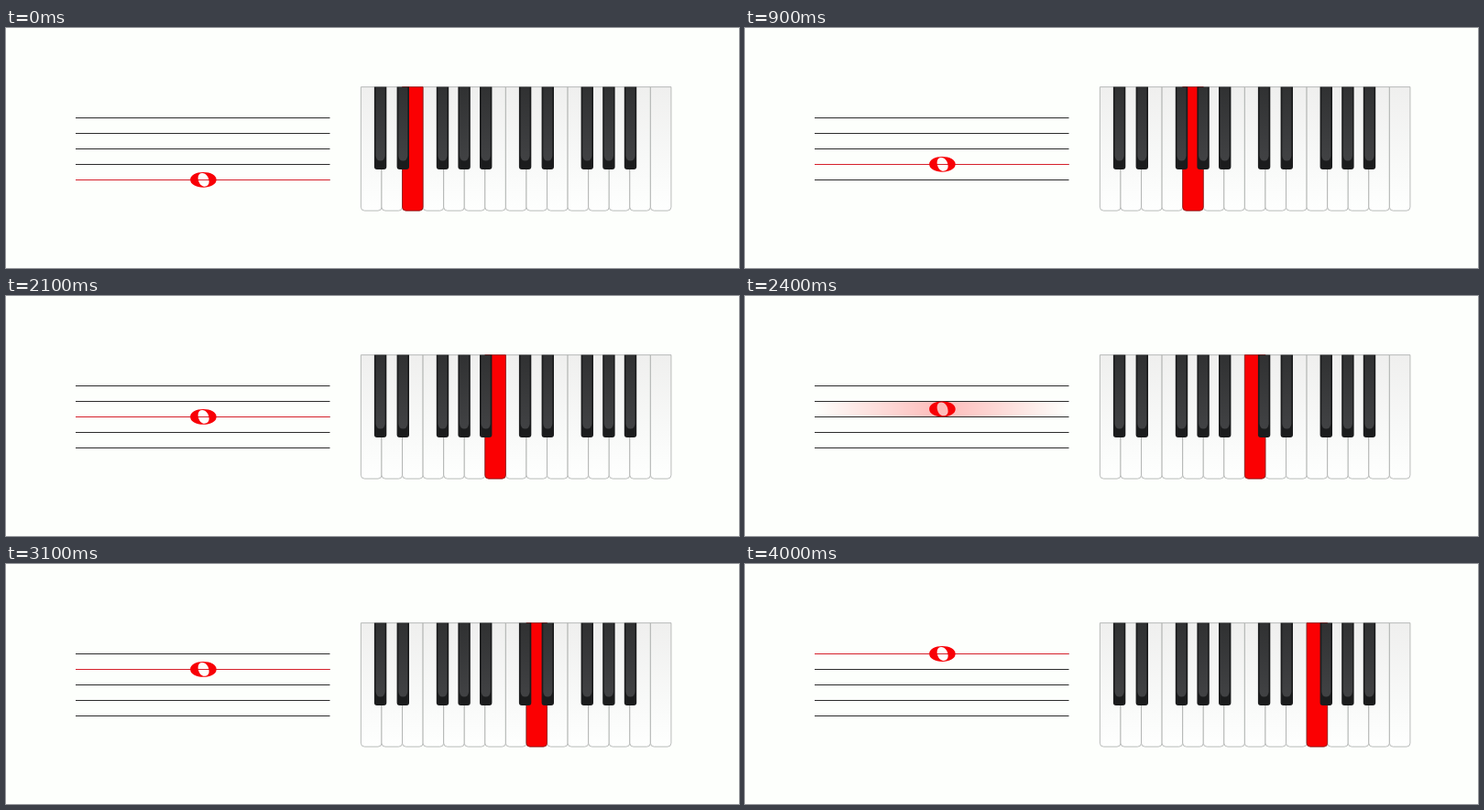
An HTML page that plays this animation: 800x263 px, repeating every 4.7 s.

```html
<!DOCTYPE html>
<html lang="en">
<head>
<meta charset="utf-8">
<title>Notes on the staff and the keyboard</title>
<style>
  html, body { margin: 0; width: 100%; height: 100%; overflow: hidden; background: #fdfffc; }
  svg { display: block; width: 800px; height: 263px; }
  .note { visibility: hidden; animation: middle 4.7s step-end infinite; }
  .note.first { animation-name: first; }
  .note.last { animation-name: last; }
  /* 400 ms, 500 ms and the closing 800 ms of a 4700 ms loop */
  @keyframes first { 0% { visibility: visible; } 8.5106%, 100% { visibility: hidden; } }
  @keyframes middle { 0% { visibility: visible; } 10.6383%, 100% { visibility: hidden; } }
  @keyframes last { 0% { visibility: hidden; } 82.9787%, 100% { visibility: visible; } }
</style>
</head>
<body>
<svg viewBox="0 0 800 263">
  <defs>
    <linearGradient id="ivory" x1="0" y1="0" x2="0" y2="1">
      <stop offset="0" stop-color="#efefee"/>
      <stop offset=".6" stop-color="#f8f9f8"/>
      <stop offset="1" stop-color="#fefffe"/>
    </linearGradient>
    <linearGradient id="ebony" x1="0" y1="0" x2="0" y2="1">
      <stop offset="0" stop-color="#303132"/>
      <stop offset="1" stop-color="#414244"/>
    </linearGradient>
    <linearGradient id="glow">
      <stop offset="0" stop-color="#f00" stop-opacity="0"/>
      <stop offset=".5" stop-color="#f00" stop-opacity=".27"/>
      <stop offset="1" stop-color="#f00" stop-opacity="0"/>
    </linearGradient>
  </defs>
  <g id="bands"></g>
  <g id="staff"></g>
  <g id="heads"></g>
  <g id="whites"></g>
  <g id="pressed"></g>
  <g id="blacks"></g>
</svg>
<script>
  const KEY_LEFT = 387.4, KEY_TOP = 64.6, KEY_WIDTH = 22.57, KEY_HEIGHT = 135.6;
  const STAFF_LEFT = 76, STAFF_WIDTH = 277.5, BOTTOM_LINE = 166.3, GAP = 16.95;
  const NOTE_COUNT = 9, FIRST_KEY = 2;

  function add(layer, tag, attrs) {
    const el = document.createElementNS('http://www.w3.org/2000/svg', tag);
    for (const name in attrs) el.setAttribute(name, attrs[name]);
    document.getElementById(layer).append(el);
    return el;
  }

  function schedule(el, i) {
    el.classList.add('note');
    if (i === 0) el.classList.add('first');
    else if (i === NOTE_COUNT - 1) el.classList.add('last');
    else el.style.animationDelay = `${i * 500 - 100}ms`;
  }

  function staffLine(y, color) {
    return add('staff', 'rect', {
      x: STAFF_LEFT, y: Math.floor(y), width: STAFF_WIDTH, height: 1, fill: color
    });
  }

  function whiteKey(layer, i, fill, stroke) {
    const x = KEY_LEFT + i * KEY_WIDTH, w = KEY_WIDTH, h = KEY_HEIGHT, r = 4;
    return add(layer, 'path', {
      d: `M${x} ${KEY_TOP}h${w}v${h - r}q0 ${r} ${-r} ${r}h${2 * r - w}q${-r} 0 ${-r} ${-r}z`,
      fill, stroke, 'stroke-width': .8
    });
  }

  function blackKey(x) {
    add('blacks', 'path', {
      d: `M${x} 64.5h13.4v87.5q0 3 -3 3h-7.4q-3 0 -3 -3z`, fill: '#1b1c1d'
    });
    add('blacks', 'path', {
      d: `M${x + 1.7} 65h10v75q-.5 5.5 -5 5.5t-5 -5.5z`, fill: 'url(#ebony)'
    });
  }

  function wholeNote(y) {
    return add('heads', 'path', {
      d: 'M-14.3 0C-14.3 -5 -8 -8.4 0 -8.4S14.3 -5 14.3 0S8 8.4 0 8.4S-14.3 5 -14.3 0Z' +
         'M-5.8 -2.2C-5.8 -5.6 -3.8 -7.4 -1.1 -7.4C3 -7.4 6.2 -2.8 6.2 2.2' +
         'C6.2 5.5 4 7.4 1.3 7.4C-2.8 7.4 -5.8 2.8 -5.8 -2.2Z',
      'fill-rule': 'evenodd', fill: '#f80006', transform: `translate(215.4 ${y})`
    });
  }

  for (let i = 0; i < 5; i++) staffLine(BOTTOM_LINE - i * GAP, '#2b2b2b');
  for (let i = 0; i < 15; i++) whiteKey('whites', i, 'url(#ivory)', '#a9abaa');
  [401.9, 426.6, 469.8, 493.4, 517, 559.9, 584.6, 627.6, 651.2, 674.8].forEach(blackKey);

  for (let i = 0; i < NOTE_COUNT; i++) {
    const y = BOTTOM_LINE - i * GAP / 2;
    const mark = i % 2
      ? add('bands', 'rect', {
          x: STAFF_LEFT, y: y - GAP / 2, width: STAFF_WIDTH, height: GAP, fill: 'url(#glow)'
        })
      : staffLine(y, '#d5202a');
    const parts = [mark, wholeNote(y), whiteKey('pressed', FIRST_KEY + i, '#fb0002', '#8d1515')];
    parts.forEach(el => schedule(el, i));
  }
</script>
</body>
</html>
```
